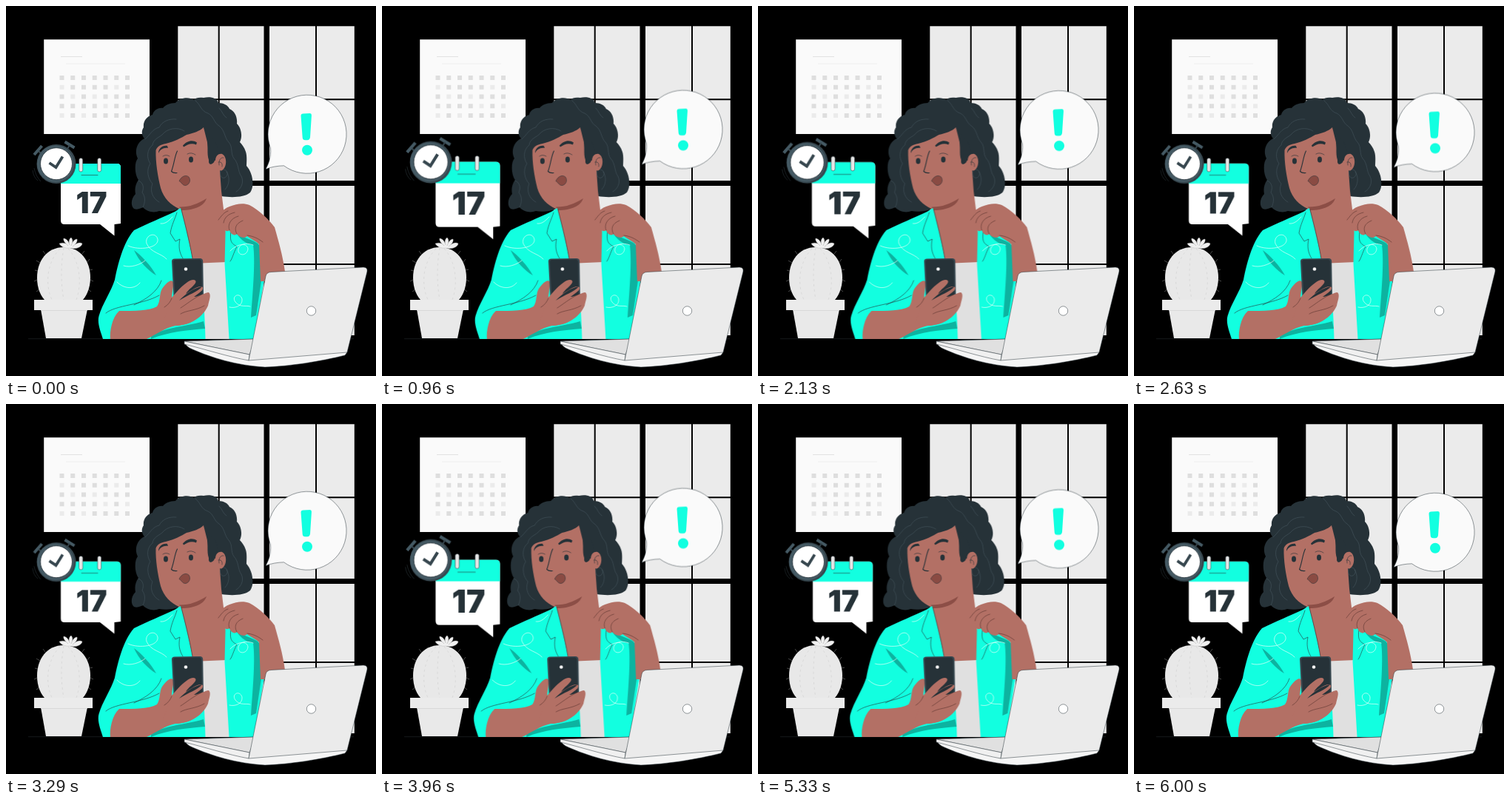
Write an HTML page that moves like this. It is 500 px wide and 500 px high and loops after 6.04 s.

```html
<!DOCTYPE html>
<html lang="en">
<head>
<meta charset="utf-8">
<title>Appointment reminder</title>
<style>
  html, body { margin: 0; width: 100%; height: 100%; overflow: hidden; background: #000; }
  svg { display: block; width: 100vw; height: 100vh; }
  text { font: 900 40px Inter, "Open Sans", sans-serif; }

  .teal { fill: #12ffe0; }
  .shade { fill: #0db3a0; }
  .skin { fill: #b37065; }
  .dusk { fill: #8c4e46; }
  .ink { fill: #263238; }
  .line { fill: none; stroke: #263238; stroke-width: .6; stroke-linecap: round; stroke-linejoin: round; }
  .crease { stroke: #5c3430; }
  .swirl { fill: none; stroke: #e9fffb; stroke-width: .7; stroke-linecap: round; }
  .strand { fill: none; stroke: #52636b; stroke-width: .45; stroke-linecap: round; }
  .edge { stroke: #263238; stroke-width: .5; stroke-linejoin: round; }

  #reminder, #bubble, #woman { animation: 6.04s linear infinite; }
  #reminder { animation-name: beat; transform-origin: 95.5px 246px; }
  #bubble { animation-name: bob; }
  #woman { animation-name: shake; }

  /* Two beats per 3 s, first one starting at 0.5 s */
  @keyframes beat {
    0%, 8.28%, 23.18%, 28.15%, 38.08%, 57.95%, 72.85%, 77.81%, 87.75%, 100% { transform: scale(1); }
    13.25%, 33.11%, 62.91%, 82.78% { transform: scale(1.1); }
  }
  /* 10 px up and down every 3 s */
  @keyframes bob {
    0%, 49.67%, 99.34%, 100% { transform: translateY(0); }
    24.83%, 74.5% { transform: translateY(-10px); }
  }
  /* Nervous sideways shake, once in 6 s */
  @keyframes shake {
    0%, 99.34%, 100% { transform: translateX(0); }
    9.93%, 89.4% { transform: translateX(-1px); }
    19.87%, 79.47% { transform: translateX(2px); }
    29.8%, 49.67%, 69.54% { transform: translateX(-4px); }
    39.74%, 59.6% { transform: translateX(4px); }
  }
</style>
</head>
<body>
<svg viewBox="0 0 500 500">
  <defs>
    <clipPath id="desk"><path d="M100 100H400V449.500H100Z"/></clipPath>
  </defs>

  <g id="window">
    <path fill="#ebebeb" d="M232.300 27.200H348.500V445H232.300ZM356 27.200H470.800V445H356Z"/>
    <path fill="none" stroke="#000" stroke-width="2" d="M287.700 27V445M419 27V445M232 126.300H471M232 349H471"/>
    <path d="M230 236H472V243H230Z"/>
  </g>

  <g id="planner">
    <path fill="#fafafa" d="M51.200 45.200H194V173H51.200Z"/>
    <path fill="none" stroke="#dcdcdc" stroke-width=".8" d="M74 68.500H103"/>
    <path fill="none" stroke="#ececec" stroke-width=".8" d="M81 78H161"/>
    <g id="days"></g>
  </g>

  <g id="cactus">
    <path fill="none" stroke="#777" stroke-width=".6" d="M46 347l-5-3M43 358l-4-1M42 370l-4 2M45 383l-4 3M110 346l3-4M113 357l4-1M114 370l4 2M111 383l4 3M53 335l-3-4M103 335l3-4"/>
    <path fill="#e8e8e8" d="M78 326C101 326 114 345 114 367C114 382 108 394 101 400H55C47 393 42 382 42 367C42 345 55 326 78 326Z"/>
    <path fill="none" stroke="#cfcfcf" stroke-width=".6" stroke-dasharray="3 4" d="M73 328C56 345 52 375 62 397M78 327C74 350 74 375 78 397M84 328C100 345 103 375 95 397"/>
    <path fill="#f0f0f0" stroke="#b5b5b5" stroke-width=".4" d="M86 327C80 328 74 325 72 321C78 319 82 321 84 324C79 320 77 316 78 314C83 315 85 319 86 323C84 318 86 314 88 313C91 316 90 320 88 324C90 318 93 315 96 315C97 319 93 323 90 325C95 320 100 319 103 321C102 326 95 329 86 327Z"/>
    <path fill="#e9e9e9" d="M47 410H110L102 449H54Z"/>
    <path fill="#ebebeb" d="M38 397H117V411H38Z"/>
    <path fill="none" stroke="#cfcfcf" stroke-width=".6" d="M47 411.500H110"/>
  </g>

  <path fill="none" stroke="#15191b" d="M30 449.700H470"/>

  <g id="reminder">
    <path fill="#fff" d="M79 213H150Q155 213 155 218V294L146.500 295V310.500L127 295H79Q74 295 74 290V218Q74 213 79 213Z"/>
    <path class="teal" d="M79 213H150Q155 213 155 218V240H74V218Q74 213 79 213Z"/>
    <path class="line" d="M102 228.500H124"/>
    <g class="edge" fill="#e6e6e6">
      <rect x="98.700" y="205.500" width="5" height="18.500" rx="2.500"/>
      <rect x="123.700" y="205.500" width="5" height="18.500" rx="2.500"/>
    </g>
    <text class="ink" x="115.500" y="280" text-anchor="middle">17</text>
    <path fill="none" stroke="#20282c" stroke-width=".8" d="M36 222Q37 231 43 236M38 219Q40 230 47 237"/>
    <path fill="none" stroke="#455a64" stroke-width="4" d="M38 201L48.500 189M79.500 183.500L92.500 191.500"/>
    <path fill="none" stroke="#37474f" stroke-width="2" d="M44 196l5 5M86 188l-3 5"/>
    <circle cx="68" cy="213.500" r="26.500" fill="#37474f"/>
    <circle cx="66.800" cy="213.200" r="24.800" fill="#455a64"/>
    <circle cx="68" cy="213.200" r="21.500" fill="#fff" stroke="#263238" stroke-width=".8"/>
    <path fill="none" stroke="#37474f" stroke-width="3.800" d="M58.500 212L67.500 218L76.500 203.500"/>
  </g>

  <g id="bubble">
    <path fill="#fafafa" class="edge" d="M357.500 192A53 53 0 1 1 375.500 215.800C367 216 358 217.500 351 220.500C355 213 358.500 204 357.500 192Z"/>
    <path class="teal" d="M398.500 148Q398.500 145.500 401 145.400L410.500 145Q413 145 412.900 148L411 177.500Q410.500 181 407 181.200H404.500Q401 181.200 400.700 178Z"/>
    <circle class="teal" cx="407" cy="194.800" r="7"/>
  </g>

  <g clip-path="url(#desk)">
    <g id="woman">
      <path class="ink" d="M254 127C247 122 234 124 229 131C221 131 215 134 212 138C205 137 199 142 198 147C190 149 185 156 186 164C182 170 184 176 187 179C177 184 173 196 178 206C173 212 174 228 179 235C174 242 174 249 175 254C169 260 168 270 173 274C178 276 183 273 185 272C190 278 200 280 207 277C216 279 228 277 235 274L260 240L291 257C304 259 322 259 330 252C336 244 334 226 325 216C325 211 326 203 324 197C322 191 319 187 316 184C320 176 318 165 312 159C313 150 309 142 302 139C300 134 294 131 287 131C285 124 276 122 267 124C261 123 256 124 254 127Z"/>
      <g class="strand">
        <path d="M241 169C232 163 218 165 211 174C206 178 199 180 198 188C190 194 190 206 195 213C189 222 192 234 198 240C194 250 198 260 207 265"/>
        <path d="M188 180C195 174 198 166 207 164C211 156 220 152 230 153M179 236C185 238 187 245 184 252C189 258 188 266 185 272"/>
        <path d="M256 128C263 133 263 142 273 145C281 149 281 158 288 162C296 168 295 178 301 184C307 191 303 199 308 206C315 213 313 224 318 230C322 238 318 247 311 251"/>
        <path d="M298 224C303 231 302 242 296 248M288 138C293 143 293 148 298 151"/>
      </g>

      <!-- head and neck -->
      <path class="skin" d="M202.500 195C204 190 209 187 216 186C228 183 237 178 244 174C253 172 262 169 267 164C270 170 272 176 272 181C273 188 273 196 274 204L283 209C283 202 288 199 292 200C299 203 299 218 292 222Q290 223 289 222L291 250L296 291L300 352H253C250 328 242 300 234 274C223 269 213 260 209 246C205 230 202 211 202.500 195Z"/>
      <path class="dusk" d="M234 271.500C247 272 258 268 271 260C268 270 255 276 237 276Z"/>
      <path class="ink" d="M267 164L283 184Q288 193 285 201C281 204 284 211 278 213.500Q273.500 215 274 208C271 199 274 189 271 180Z"/>
      <path class="line" d="M294 205C290 204 287 209 288 215M287 211C290 210 293 212 292 217"/>
      <path class="strand" d="M290 223C287 232 296 236 299 228C300 224 297 221 294 221"/>
      <path class="ink" d="M206 199C208 194 213 191 219 192L218 189C211 188 206 193 206 199ZM239 188.500C244 182.500 252 180 258 184.500L257 187.500C251 184.500 245 187 240 190.500Z"/>
      <ellipse class="ink" cx="216" cy="209.500" rx="3" ry="4"/>
      <ellipse class="ink" cx="250" cy="207.500" rx="3" ry="4"/>
      <path class="line" d="M212 203Q216 200 221 203M245 200Q250 197 256 201"/>
      <path class="line" style="stroke-width:1.100" d="M231.500 196C228 202 227 215 223.500 223.500Q226 226 231 225.500"/>
      <path fill="#8a4b43" class="edge" d="M234 236.500C237 230 243 227.500 247 231C250 235 248.500 241 243 242.500C238 242.500 239 240 234 236.500Z"/>

      <!-- top and shirt -->
      <path fill="#e0e0e0" d="M252 348L298 346L303 450H268Z"/>
      <path class="teal" d="M228 278L236 273C243 299 249 325 253 348L264 350C266 382 269 420 269.500 450H131C128 440 123 429 125.500 419C130 403 142 386 147 370C151 350 158 320 173 303C191 294 211 286 228 278Z"/>
      <path class="teal" d="M297 288C312 294 330 300 341 320L350 362L336 450H301.500L295.500 348Z"/>
      <path class="shade" d="M312 308C325 315 338 317 343 324L346 365L338 418L331 421C334 380 337 345 334 323C326 322 318 317 312 308ZM173 330C182 336 196 351 203 364C191 357 180 345 173 330ZM196 446C214 434 240 434 267 426L269 436C245 438 220 440 196 450Z"/>
      <path class="line" d="M231 279C228 289 224 295 222 307L229 318L235 315C233 325 234 333 239 341M237 275C244 303 250 326 253 348M304 304C302 319 305 321 312 325C307 335 306 341 303 345"/>
      <path class="line" d="M173 404C190 396 205 386 210 371M135 415C148 404 184 404 207 391"/>
      <path class="swirl" d="M165 324C180 331 207 327 205 315C202 304 187 310 190 321C196 334 210 334 217 342M159 351C168 354 181 350 188 344M209 294C216 295 221 289 225 285"/>
      <path class="swirl" d="M303 331C310 323 325 318 327 328C326 339 312 338 314 328C317 319 329 321 334 323M302 407C310 409 320 405 319 396C316 386 304 392 310 400C316 408 325 404 330 406M150 373C160 383 174 383 181 374"/>

      <!-- raised arm -->
      <path class="skin" d="M287 291C287 281 292 275 302 271C312 267 321 266 329 269C342 276 354 287 363 299C368 317 374 337 377 359L372 372H344L342 322C337 317 331 315 326 311C322 315 315 312 312 308C308 312 303 307 302 303C297 307 293 301 294 293C293 289 290 290 287 291Z"/>
      <path class="line crease" d="M294 293C295 286 300 281 309 279M302 303C299 296 303 287 314 284M312 308C308 301 310 294 320 290M326 310C335 311 342 315 347 319M287 289C291 284 294 279 300 277"/>

      <!-- phone in hand -->
      <path class="skin" d="M141 450C140 440 143 421 153 412C174 412 194 412 204 406C209 399 207 388 211 382C216 375 223 368 226 373C227 379 224 388 224 395L250 398L270 408C260 424 249 431 229 432C214 435 203 444 190 450Z"/>
      <path fill="#37474f" d="M228 341.500L262 341Q266 341 266.200 345L267 392Q267 398 262 398H232Q227 398 226.500 393L224 345Q224 341.500 228 341.500Z"/>
      <path class="ink" d="M229 343L261 342.500Q264 342.500 264.200 346L265 390Q265 396 260 396H233Q229 396 228.500 392L226 346Q226 343 229 343Z"/>
      <circle cx="243" cy="355.500" r="2.300" fill="#f5f5f5"/>
      <path class="skin" d="M223 395C229 389 235 380 244 374C250 369 257 369 256.500 373C255 378 246 383 243 389C251 384 259 378 264 379C268 380 266 384 262 387L254 393C261 393 269 387 274 387C278 390 274 399 273 405C267 419 252 430 232 432L212 429Z"/>
      <path class="ink" d="M234 398C242 389 256 380 265 379C260 386 246 390 234 398Z"/>
      <path class="line crease" d="M236 408C244 403 252 396 264 390M236 416C244 411 256 412 268 405M224 395C222 400 219 404 214 407"/>
    </g>
  </g>

  <g id="laptop" class="edge">
    <path fill="#f5f5f5" d="M241 453L336 450L461 461V468L458 472C427 480 383 487 350 488C312 486 277 475 252 464Q242 460 241 453Z"/>
    <path fill="#e0e0e0" d="M241 453L337 450L329 471Z"/>
    <path fill="#f0f0f0" d="M241 453L329 471L328 479C300 474 270 464 241 457Z"/>
    <path fill="#ebebeb" d="M358 359.500L483 353Q489 353 488 359L461 468L328 479L351 365Q352 360 358 359.500Z"/>
    <circle cx="412.500" cy="412" r="6.200" fill="#fff"/>
  </g>
</svg>
<script>
  // Seven columns by five rows of day squares, some of them paler
  const days = document.getElementById("days");
  for (let row = 0; row < 5; row++) {
    for (let col = 0; col < 7; col++) {
      const day = document.createElementNS(days.namespaceURI, "rect");
      const pale = row > 0 && (col * 3 + row * 5) % 7 > 4;
      const box = { x: 72.5 + col * 14.75, y: 94 + row * 12.75, width: 6, height: 6, fill: pale ? "#ebebeb" : "#dedede" };
      for (const key in box) day.setAttribute(key, box[key]);
      days.append(day);
    }
  }
</script>
</body>
</html>
```
